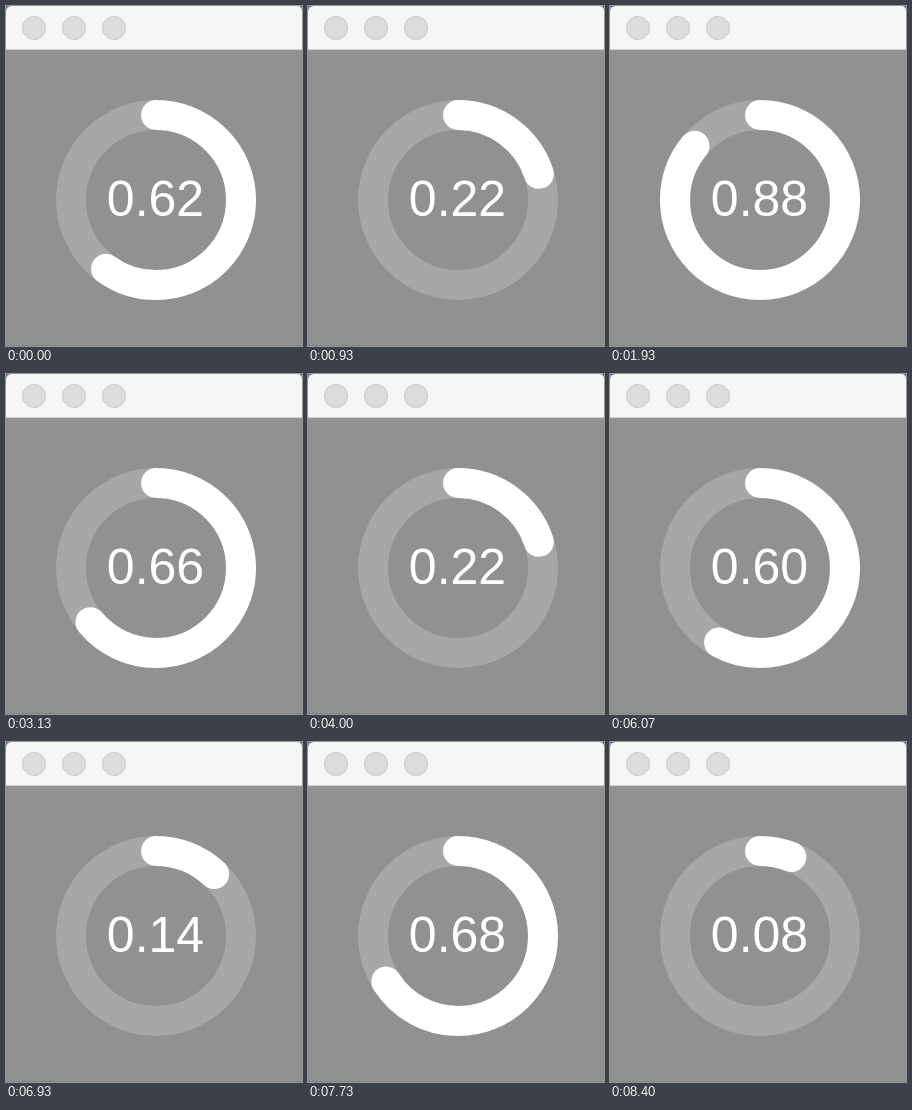
Write an HTML page that moves like this. It is 296 by 340 pixels and loops after 8470 ms.

```html
<!DOCTYPE html>
<html lang="en">
<head>
<meta charset="utf-8">
<title>Progress ring</title>
<style>
  html, body { margin: 0; width: 100%; height: 100%; overflow: hidden; background: #919191; }
  svg { display: block; }
  .dots { fill: #dcdcdc; stroke: #c9c9c9; }
  .ring { fill: none; stroke-width: 30; }
  text { font: 50px "Liberation Sans", Arial, sans-serif; fill: #fff; text-anchor: middle; }
</style>
</head>
<body>
<svg width="296" height="340" viewBox="0 0 296 340">
  <rect width="296" height="20" fill="#587493"/>
  <path d="M0 43V6Q0 0 6 0H291Q296 0 296 5V43Z" fill="#f6f6f6"/>
  <path d="M0 43.5H296" stroke="#d2d2d2"/>
  <path d="M0 339.5H296" stroke="#858283"/>
  <g class="dots">
    <circle cx="28" cy="22" r="11.5"/>
    <circle cx="68" cy="22" r="11.5"/>
    <circle cx="108" cy="22" r="11.5"/>
  </g>
  <circle class="ring" cx="150" cy="194" r="85" stroke="#a7a7a7"/>
  <circle class="ring" id="arc" cx="150" cy="194" r="85" stroke="#fff" stroke-linecap="round"
    pathLength="100" transform="rotate(-90 150 194)"/>
  <text id="label" x="149.5" y="210"></text>
</svg>
<script>
  const LOOP = 8470, FRAME = 200 / 3, LAST = 126, STEPS = 51;
  const arc = document.getElementById('arc');
  const label = document.getElementById('label');

  // [frame, total ticks]: a slightly uneven timer, each tick adds 0.02
  const pace = [[0, 31], [13, 60], [29, 95], [39, 118], [47, 135], [52, 146],
    [75, 198], [91, 234], [104, 262], [117, 291], [126, 310]];

  function ticksAt(frame) {
    const i = Math.max(1, pace.findIndex(([f]) => f >= frame));
    const [f0, n0] = pace[i - 1], [f1, n1] = pace[i];
    return Math.round(n0 + (n1 - n0) * (frame - f0) / (f1 - f0));
  }

  function draw(now) {
    const frame = Math.min(LAST, Math.floor((now % LOOP + 5) / FRAME));
    const step = ticksAt(frame) % STEPS;
    // The arc trails the label by one tick
    const drawn = (step + STEPS - 1) % STEPS;
    label.textContent = (step / 50).toFixed(2);
    arc.setAttribute('stroke-dasharray', `${drawn * 2} 200`);
  }

  let start;
  function loop(now) {
    start ??= now;
    draw(now - start);
    requestAnimationFrame(loop);
  }
  draw(0);
  requestAnimationFrame(loop);
</script>
</body>
</html>
```
